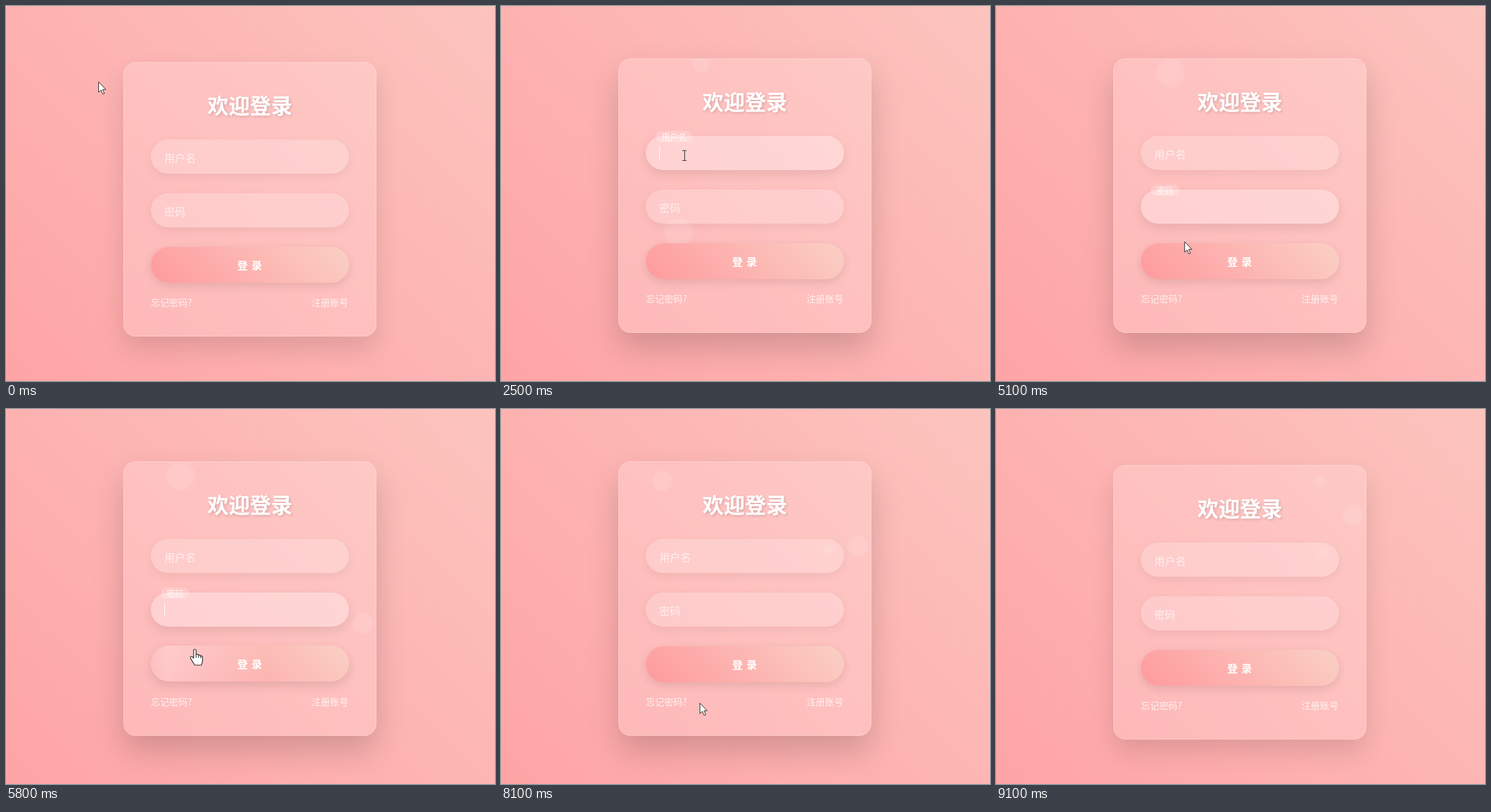
These frames come from a looping animation (800x615 px, 10 s). An HTML page:

```html
<!DOCTYPE html>
<html lang="zh-CN">
<head>
<meta charset="utf-8">
<style>
  html, body { margin: 0; width: 100%; height: 100%; overflow: hidden; }
  body {
    position: relative; color: #fff;
    background: linear-gradient(45deg, #fea4a6, #fcc4be);
    font-family: "Noto Sans CJK SC", "Noto Sans CJK", "Noto Sans", sans-serif;
  }
  div, svg { position: absolute; box-sizing: border-box; white-space: nowrap; }
  #card {
    left: 192px; top: 86px; width: 414px; height: 450px; border-radius: 20px;
    background: rgba(255, 255, 255, .17);
  }
  #clip { inset: 0; border-radius: 20px; overflow: hidden; }
  #edge { inset: 0; border-radius: 20px; border: 1px solid rgba(255, 255, 255, .25); }
  .shine {
    top: 0; width: 100%; height: 100%;
    background: linear-gradient(90deg, rgba(255,255,255,0), rgba(255,255,255,.42), rgba(255,255,255,0));
  }
  .bubble { border-radius: 50%; background: rgba(255, 255, 255, .12); filter: blur(2px); }
  #title {
    left: 0; width: 100%; top: 45px; line-height: 50px; text-align: center;
    font-size: 34.7px; font-weight: 700; text-shadow: 2px 2px 4px rgba(0, 0, 0, .14);
  }
  .field { left: 45px; width: 324px; height: 56px; border-radius: 28px; }
  .label { line-height: 18px; border-radius: 9px; }
  .caret { left: 22px; top: 17px; width: 1px; height: 22px; background: #fff; }
  #button {
    left: 45px; top: 303px; width: 324px; height: 59px; border-radius: 30px; overflow: hidden;
    background: linear-gradient(45deg, #ff9a9e, #fad0c4);
    font-size: 17.3px; font-weight: 700; letter-spacing: 1px; line-height: 59px; text-align: center;
  }
  #button span { position: relative; }
  #buttonShadow { left: 45px; top: 303px; width: 324px; height: 59px; border-radius: 30px; }
  .link { top: 384px; line-height: 20px; font-size: 15px; color: rgba(255, 255, 255, .8); }
  #cursor { left: 0; top: 0; overflow: visible; width: 1px; height: 1px; }
</style>
</head>
<body>
<div id="card">
  <div id="clip"><div class="shine" id="cardShine"></div></div>
  <div id="edge"></div>
  <div id="title">欢迎登录</div>
  <div class="field" style="top:127px"><div class="label">用户名</div><div class="caret"></div></div>
  <div class="field" style="top:215px"><div class="label">密码</div><div class="caret"></div></div>
  <div id="buttonShadow"></div>
  <div id="button"><div class="shine" id="buttonShine"></div><span>登 录</span></div>
  <div class="link" style="left:45px">忘记密码?</div>
  <div class="link" style="right:46px">注册账号</div>
</div>
<svg id="cursor"><path stroke-linejoin="round"/></svg>
<script>
const LOOP = 10000, STEP = 100, BLINK = 530;
const $ = id => document.getElementById(id);

// Pointer stops: time, x, y
const stops = [
  [0, 151, 124], [100, 151, 124], [800, 229, 146], [1100, 231, 146], [2000, 300, 245],
  [2600, 300, 245], [3200, 300, 328], [4000, 300, 328], [5000, 308, 386], [5600, 309, 387],
  [5750, 309, 394], [6300, 309, 394], [7100, 325, 482], [8100, 325, 482], [8700, 724, 500], [LOOP, 724, 500]
];
const POINTER_GONE = 9050;
const shapes = {
  arrow: ["M.5 .5V17.5L4.4 13.8L7.3 20.5L9.9 19.4L7 12.9H12.3Z", "#fff", 1],
  hand: ["M-2 2a2 2 0 0 1 4 0v7c1-1 4-1 4 1c1-1 3.500-.5 3.500 1.500c1-1 3-.5 3 1.500v5c0 4-1 5-2 8H0C-2 23-6 17-7 14.500s1-3.500 3-2l2 2zM2 9v5M6 10v4M9.500 11.500v3", "#fff", 1.2],
  beam: ["M-3.500-8h2.500l1 .5l1-.5h2.500M.5-7.500V8M-3.500 8.500h2.500l1-.5l1 .5h2.500", "none", 1]
};

// Soft bubbles: x, y at start, radius, start, end, rise in px/s
const bubbles = [
  [290, 511, 23, 500, 2700, 70], [328, 95, 14, 2200, 3400, 0], [285, 110, 24, 5100, 7200, 0],
  [584, 386, 17, 5200, LOOP, 56], [264, 118, 17, 7200, 8900, 0], [535, 230, 9, 8000, LOOP, 0],
  [530, 112, 10, 8900, LOOP, 0]
].map(([x, y, r, from, to, rise]) => {
  const el = document.createElement("div");
  el.className = "bubble";
  el.style.cssText = `left:${x - r - 192}px;width:${2 * r}px;height:${2 * r}px`;
  $("clip").append(el);
  return { el, y: y - r - 86, from, to, rise };
});

const fields = [...document.querySelectorAll(".field")].map((el, i) => ({
  el, label: el.children[0], caret: el.children[1],
  focus: [2200, 3300][i], blur: [3300, 6200][i], blink: [2200, 3450][i]
}));

const mix = (a, b, k) => a + (b - a) * k;
const white = a => `rgba(255,255,255,${a})`;
const shadow = (y, blur, a) => `0 ${y}px ${blur}px rgba(0,0,0,${a})`;

// cubic-bezier(.25, .1, .25, 1)
function ease(x) {
  if (x <= 0) return 0;
  if (x >= 1) return 1;
  const curve = (a, b, s) => 3 * a * s * (1 - s) ** 2 + 3 * b * s * s * (1 - s) + s ** 3;
  let lo = 0, hi = 1;
  for (let i = 0; i < 20; i++) {
    const s = (lo + hi) / 2;
    if (curve(.25, .25, s) < x) lo = s; else hi = s;
  }
  return curve(.1, 1, lo);
}
const between = (t, on, off, length) => ease((t - on) / length) - ease((t - off) / length);

function pointerAt(t) {
  const i = Math.max(1, stops.findIndex(s => s[0] > t));
  const [a, b] = [stops[i - 1], stops[i]];
  const k = (t - a[0]) / (b[0] - a[0]);
  return [mix(a[1], b[1], k), mix(a[2], b[2], k)];
}

function drawPointer(t) {
  const [x, y] = pointerAt(t);
  const inside = (top, bottom) => x > 237 && x < 561 && y >= top && y <= bottom;
  const kind = inside(213, 269) || inside(301, 357) ? "beam" : inside(389, 448) ? "hand" : "arrow";
  const [d, fill, width] = shapes[kind], path = $("cursor").firstChild;
  path.setAttribute("d", d);
  path.setAttribute("fill", fill);
  path.setAttribute("stroke", "#222");
  path.setAttribute("stroke-width", width);
  $("cursor").style.transform = `translate(${x}px,${y}px)`;
  $("cursor").style.visibility = t < POINTER_GONE ? "visible" : "hidden";
}

function drawField(f, t) {
  const k = between(t, f.focus, f.blur, 300);
  f.el.style.background = white(mix(.2, .3, k));
  f.el.style.boxShadow = shadow(mix(5, 7, k), mix(15, 18, k), mix(.06, .09, k));
  Object.assign(f.label.style, {
    left: mix(22, 16, k) + "px", top: mix(21, -8.5, k) + "px",
    padding: `0 ${mix(0, 10, k)}px`, fontSize: mix(17.2, 13.4, k) + "px",
    background: white(.2 * k), color: white(mix(.7, .85, k))
  });
  const lit = Math.floor(Math.max(0, t - f.blink) / BLINK) % 2 === 0;
  f.caret.style.opacity = t > f.focus && t < f.blur && lit ? 1 : 0;
}

function draw(t) {
  const lift = between(t, 470, 8450, 300), sweep = between(t, 470, 8400, 700);
  $("card").style.transform = `translateY(${6 - 6 * lift}px)`;
  $("card").style.boxShadow = shadow(mix(20, 25, lift), mix(40, 50, lift), mix(.12, .17, lift));
  $("cardShine").style.left = mix(-100, 100, sweep) + "%";

  const press = between(t, 5700, 6700, 300);
  $("button").style.transform = $("buttonShadow").style.transform = `translateY(${-2 * press}px)`;
  $("buttonShadow").style.boxShadow = shadow(mix(5, 8, press), mix(15, 20, press), mix(.1, .13, press));
  $("buttonShine").style.left = mix(-100, 100, between(t, 5700, 6700, 500)) + "%";

  fields.forEach(f => drawField(f, t));
  for (const { el, y, from, to, rise } of bubbles) {
    el.style.top = y - rise * (t - from) / 1000 + "px";
    el.style.visibility = t >= from && t < to ? "visible" : "hidden";
  }
  drawPointer(t);
}

function tick() {
  draw(Math.floor(performance.now() % LOOP / STEP) * STEP);
  requestAnimationFrame(tick);
}
tick();
</script>
</body>
</html>
```
